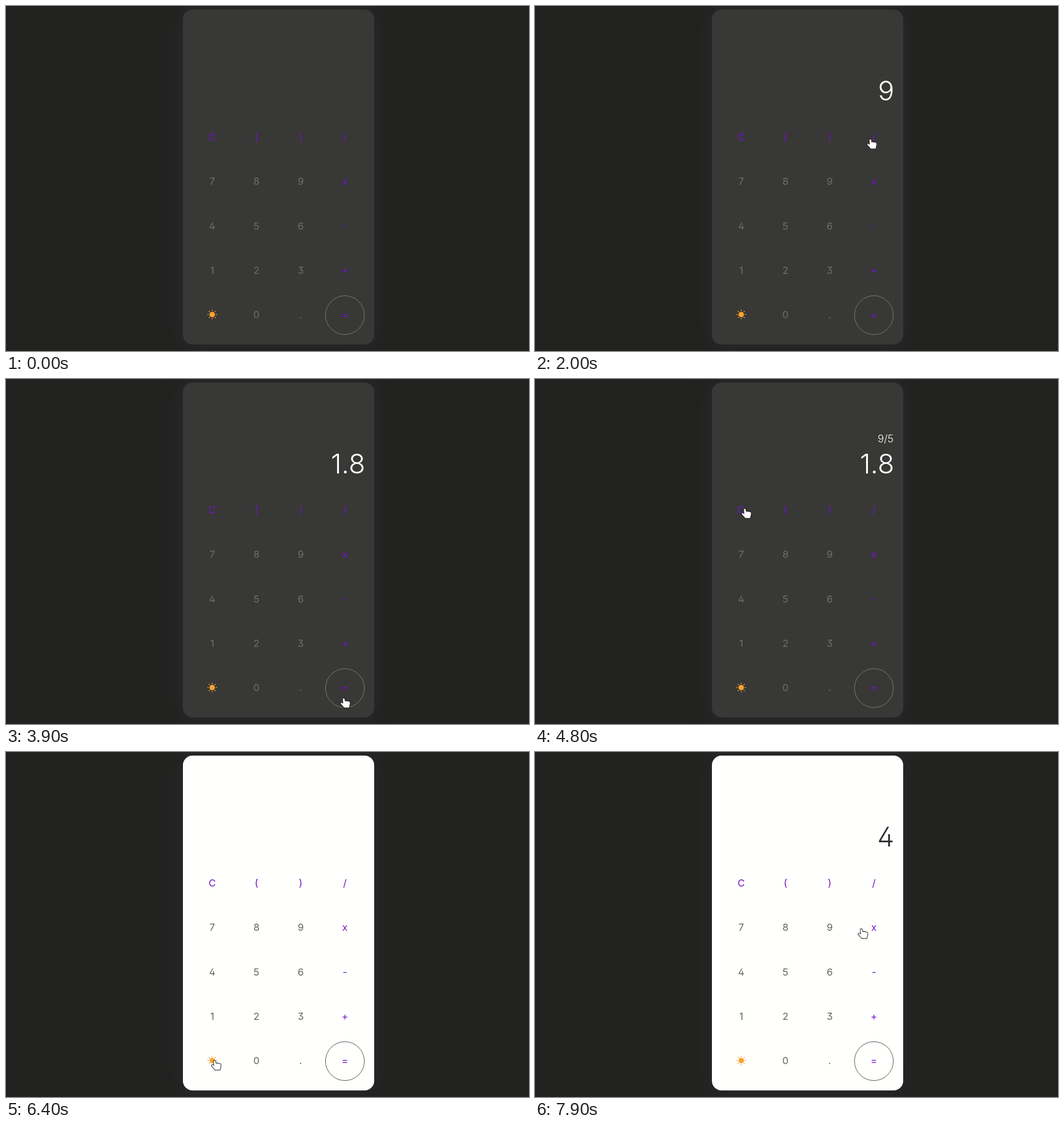
These frames come from a looping animation (875 by 577 pixels, 8000 ms). An HTML page:

```html
<!DOCTYPE html>
<html lang="en">
<head>
<meta charset="utf-8">
<title>Calculator</title>
<style>
  html, body { margin: 0; width: 100%; height: 100%; overflow: hidden; background: #222221; }
  #stage {
    position: relative; width: 875px; height: 577px; overflow: hidden;
    --card: #383836; --digit: #6e6e6c; --ring: #777775; --text: #fff; --op: #7412cf;
  }
  #stage.light { --card: #fffffe; --digit: #646462; --ring: #5c5c5a; --text: #2d2d2d; --op: #7914bd; }
  #card {
    position: absolute; left: 296px; top: 6px; width: 320px; height: 560px;
    border-radius: 16px; background: var(--card); box-shadow: 0 0 30px #2b2c2e;
  }
  svg { position: absolute; left: 0; top: 0; }
  text { font-family: Inter, "Open Sans", sans-serif; font-feature-settings: "cv02", "cv09"; }
  .key { font-size: 16.5px; font-weight: 400; text-anchor: middle; fill: var(--digit); }
  .op { fill: var(--op); }
  .out { text-anchor: end; fill: var(--text); }
  #main { font-size: 45.5px; font-weight: 300; }
  #past { font-size: 17.5px; font-weight: 350; }
  #ring { fill: none; stroke: var(--ring); }
  #sun { fill: #f9a32f; stroke: #f9a32f; stroke-width: 1.5; stroke-linecap: round; }
  .cursor { fill: #fff; stroke: #1c1c1c; stroke-width: 1.8; stroke-linejoin: round; paint-order: stroke; }
</style>
</head>
<body>
<div id="stage">
  <div id="card"></div>
  <svg width="875" height="577" viewBox="0 0 875 577">
    <g id="keys"></g>
    <circle id="ring" cx="567" cy="517" r="32.5"/>
    <g id="sun" transform="translate(345 516)"><circle r="4.6" stroke="none"/></g>
    <text id="past" class="out" x="600" y="106"></text>
    <text id="main" class="out" x="601" y="158"></text>
    <path id="arrow" class="cursor" d="M1 1.5V16L4.3 13 7 18.7 9.2 17.8 6.7 12H11.5Z"/>
    <path id="hand" class="cursor" d="M-1.4 1Q0 -1 1.4 1L2 5Q3.5 3.8 4.7 5.2Q6 4.2 7.3 5.6Q8.8 4.8 10 6.2Q10.7 7.2 10.3 9.3L9.4 13 9 15.6H.6L.1 14.4 -4.5 9.6Q-5.5 8.2 -4.3 7.4Q-2.9 7 -.9 9Z"/>
  </svg>
</div>
<script>
const NS = "http://www.w3.org/2000/svg";
const $ = id => document.getElementById(id);
const add = (parent, tag, attrs, text = "") => {
  const el = document.createElementNS(NS, tag);
  for (const k in attrs) el.setAttribute(k, attrs[k]);
  el.textContent = text;
  parent.append(el);
};

const pitch = 74, radius = 33;
const keyX = c => 345 + c * pitch;
const keyY = r => Math.round(219 + r * 74.25);

["C()/", "789x", "456-", "123+", " 0.="].forEach((line, r) =>
  [...line].forEach((ch, c) => {
    if (ch === " ") return;
    const op = r === 0 || c === 3;
    add($("keys"), "text", { class: op ? "key op" : "key", x: keyX(c), y: keyY(r) + 6 }, ch);
  }));
for (let a = 0; a < 360; a += 45)
  add($("sun"), "path", { d: "M6.7 0H7.3", transform: `rotate(${a})` });

// Each move: leave and arrive times, hot spot at its end
const moves = [
  [300, 300, 83, 1],
  [400, 800, 520, 317],
  [1100, 1200, 484, 297],
  [1400, 2300, 562, 222],
  [2400, 3000, 415, 361],
  [3200, 3700, 565, 534],
  [4000, 4800, 351, 217],
  [5200, 6200, 349, 516],
  [6500, 6900, 389, 436],
  [6900, 7200, 360, 368],
  [7600, 7900, 546, 296]
];

const presses = [
  [1500, "9"], [2500, "/"], [3300, "5"], [3900, "="],
  [5300, "C"], [6400, "sun"], [7700, "4"]
];

const easeOut = p => 1 - (1 - p) ** 4;

function pointer(t) {
  let [, , x, y] = moves[0];
  for (const [from, to, tx, ty] of moves.slice(1)) {
    if (t <= from) break;
    const p = easeOut(Math.min(1, (t - from) / (to - from)));
    x += (tx - x) * p;
    y += (ty - y) * p;
  }
  return [x, y];
}

function calculator(t) {
  let main = "", past = "", light = false;
  for (const [at, key] of presses) {
    if (at > t) break;
    if (key === "C") main = past = "";
    else if (key === "sun") light = !light;
    else if (key === "=") {
      const [a, b] = main.split("/");
      if (t >= at + 200) past = main;
      main = String(a / b);
    } else main += key;
  }
  return { main, past, light };
}

// Distance to the nearest key centre
function overKey(x, y) {
  const near = (v, n) => Math.max(0, Math.min(n, Math.round(v / pitch)));
  const c = near(x - 345, 3), r = near(y - 219, 4);
  return Math.hypot(x - keyX(c), y - keyY(r)) < radius;
}

function place(el, shown, x, y) {
  el.style.display = shown ? "" : "none";
  el.setAttribute("transform", `translate(${Math.round(x)} ${Math.round(y)})`);
}

function draw(now) {
  const t = Math.floor(now % 8000 / 100) * 100;
  const { main, past, light } = calculator(t);
  $("main").textContent = main;
  $("past").textContent = past;
  $("stage").classList.toggle("light", light);

  const visible = t >= moves[0][0];
  const [x, y] = pointer(t);
  const hand = overKey(x, y);
  place($("hand"), visible && hand, x, y);
  place($("arrow"), visible && !hand, x, y);
}

let start;
function tick(now) {
  start ??= now;
  draw(now - start);
  requestAnimationFrame(tick);
}
draw(0);
requestAnimationFrame(tick);
</script>
</body>
</html>
```
